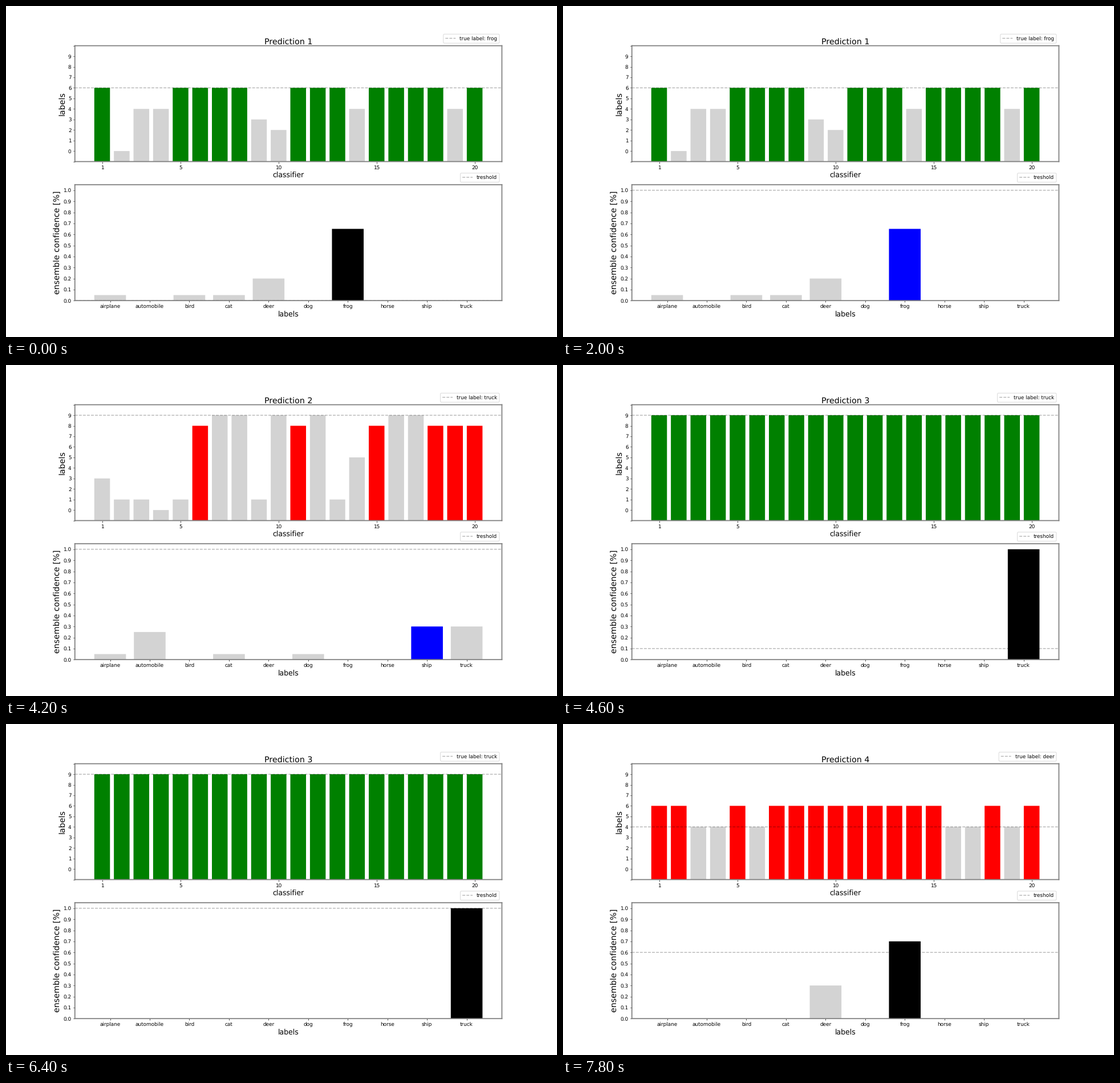
Recreate the animation shown at these times as a matplotlib script. Size 966 by 580 pixels, loop 8 s.

```python
import numpy as np
import matplotlib.pyplot as plt
from matplotlib.animation import FuncAnimation

WIDTH, HEIGHT, DPI = 966, 580, 64
STEPS = 11          # thresholds 0.0 to 1.0 for every prediction
FRAMES, INTERVAL = 40, 200

NAMES = ["airplane", "automobile", "bird", "cat", "deer",
         "dog", "frog", "horse", "ship", "truck"]

# One digit per classifier vote, followed by the true label
PREDICTIONS = [
    ("60446666326664666646", 6),
    ("31101899198915899888", 9),
    ("9" * 20, 9),
    ("66446466666666644646", 4),
]

# Subpixel edges and unhinted text give a soft, smoothly scaled look
plt.rcParams.update({
    "font.family": "DejaVu Sans",
    "font.size": 10.06,
    "text.hinting": "no_hinting",
    "path.snap": False,
    "axes.edgecolor": "gray",
    "axes.linewidth": 2,
})

fig, (top, bottom) = plt.subplots(
    2, 1, figsize=(WIDTH / DPI, HEIGHT / DPI), dpi=DPI)
fig.subplots_adjust(left=0.125, right=0.9, bottom=0.11, top=0.88, hspace=0.2)


def dashed(ax, label):
    """Add a dashed horizontal line and its legend above the axes."""
    line = ax.axhline(0, color="black", alpha=0.3, ls="--", label=label)
    legend = ax.legend(loc="lower right", bbox_to_anchor=(1, 1))
    return line, legend.get_texts()[0]


def label_axes(ax, xlabel, ylabel):
    ax.set_xlabel(xlabel, fontsize=14.1)
    ax.set_ylabel(ylabel, fontsize=16.1)


def paint(bars, heights, colors):
    for bar, height, color in zip(bars, heights, colors):
        bar.set_height(height)
        bar.set_facecolor(color)


vote_bars = top.bar(range(1, 21), np.ones(20), bottom=-1)
top.set_xlim(-0.39, 21.39)
top.set_ylim(-1, 10)
top.set_xticks([1, 5, 10, 15, 20])
top.set_yticks(range(-1, 11), ["", *map(str, range(10)), ""])
label_axes(top, "classifier", "labels")
true_line, true_text = dashed(top, "true label: frog")
title = top.text(0.5, 1.015, "", transform=top.transAxes,
                 ha="center", fontsize=16.1)

share_bars = bottom.bar(range(10), np.zeros(10))
bottom.set_xlim(-0.89, 9.89)
bottom.set_ylim(0, 1.05)
bottom.set_xticks(range(10), NAMES)
bottom.set_yticks(np.arange(11) / 10)
label_axes(bottom, "labels", "ensemble confidence [%]")
threshold_line, _ = dashed(bottom, "treshold")


def update(frame):
    index, step = divmod(frame, STEPS)
    digits, truth = PREDICTIONS[index]
    votes = np.array([int(d) for d in digits])
    shares = np.bincount(votes, minlength=10) / len(votes)
    winner = shares.argmax()
    threshold = 0.1 * step

    title.set_text(f"Prediction {index + 1}")
    true_text.set_text(f"true label: {NAMES[truth]}")
    true_line.set_ydata([truth, truth])
    threshold_line.set_ydata([threshold, threshold])

    vote_color = "green" if winner == truth else "red"
    paint(vote_bars, votes + 1,
          np.where(votes == winner, vote_color, "lightgray"))

    share_color = "black" if shares[winner] >= threshold else "blue"
    paint(share_bars, shares,
          np.where(np.arange(10) == winner, share_color, "lightgray"))
    return []


anim = FuncAnimation(fig, update, frames=FRAMES, interval=INTERVAL,
                     repeat=True, repeat_delay=0)
plt.show()
```
